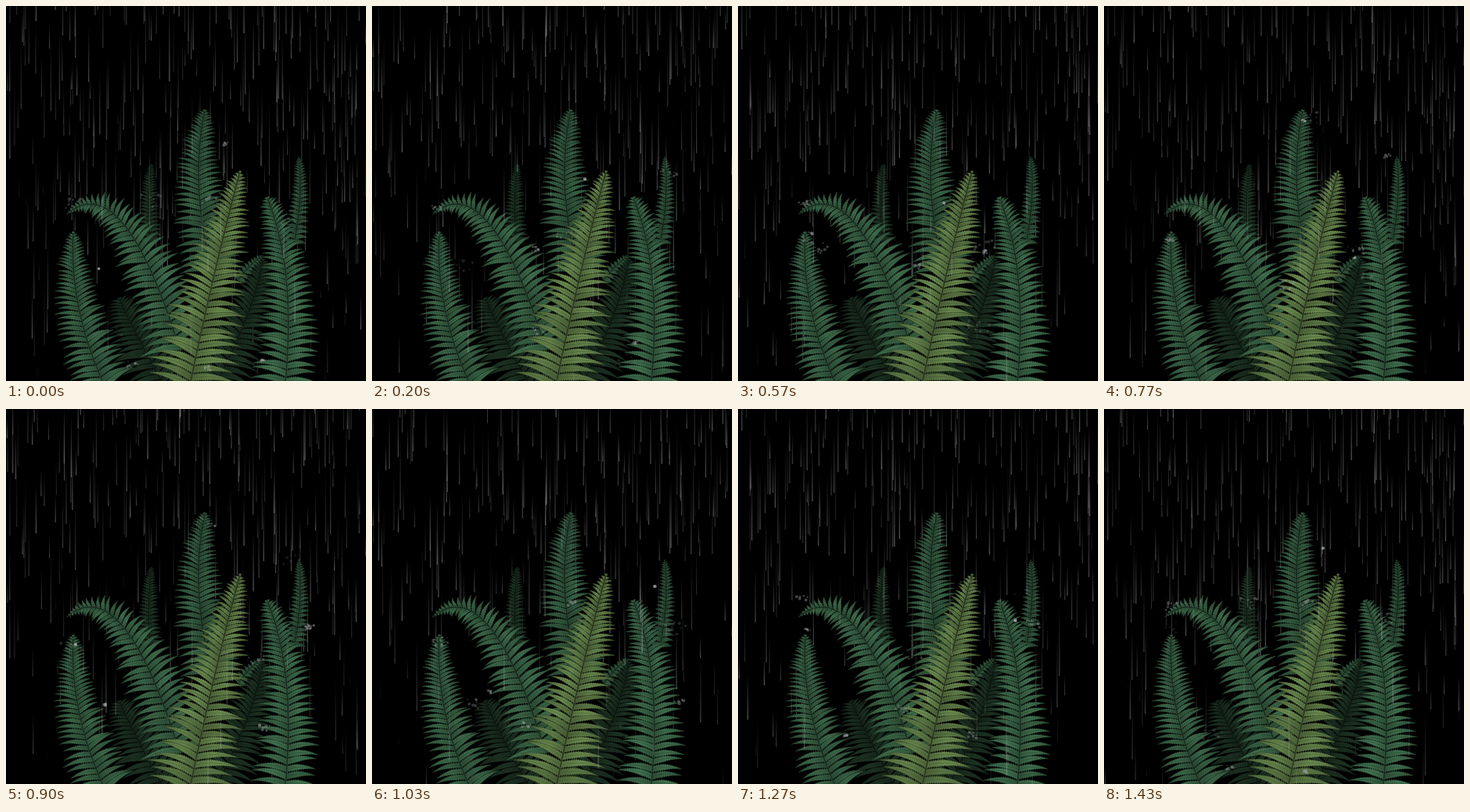
Write an HTML page with a canvas that moves like this. It is 460 px wide and 480 px high and loops after 1460 ms.

```html
<!DOCTYPE html>
<html lang="en">
<head>
<meta charset="utf-8">
<title>Ferns in the rain</title>
<style>
html, body { margin: 0; width: 100%; height: 100%; overflow: hidden; background: #000; }
canvas { display: block; width: 460px; height: 480px; }
</style>
</head>
<body>
<canvas id="stage" width="460" height="480"></canvas>
<script>
const W = 460, H = 480, LOOP = 1460, STEPS = 44;
const ctx = document.getElementById('stage').getContext('2d');

function seeded(seed) {
  return () => {
    seed = (seed + 0x6D2B79F5) | 0;
    let t = Math.imul(seed ^ (seed >>> 15), 1 | seed);
    t = (t + Math.imul(t ^ (t >>> 7), 61 | t)) ^ t;
    return ((t ^ (t >>> 14)) >>> 0) / 4294967296;
  };
}
const rand = seeded(77), vary = seeded(12);
const jitter = (r, size) => (r() - 0.5) * 2 * size;

// ---- Ferns ----

const leafLayer = document.createElement('canvas');
leafLayer.width = W;
leafLayer.height = H;
const leaf = leafLayer.getContext('2d');
const tips = [];

function trace(points) {
  leaf.beginPath();
  points.forEach(p => leaf.lineTo(p[0], p[1]));
}

// A toothed blade growing sideways from the stem, arching and then drooping.
function pinna(tone, node, side, reach, lean) {
  const { x, y, dx, dy, gap } = node;
  const n = Math.max(6, Math.round(reach / 1.4));
  const mid = [], upper = [], lower = [];
  for (let i = 0; i <= n; i++) {
    const s = i / n;
    const out = side * reach * s, rise = reach * s * (lean + 0.3 * (1 - s));
    const px = x + dy * out + dx * rise, py = y - dx * out + dy * rise;
    const half = gap * 0.49 * Math.pow(Math.min(1, (1 - s) * 1.5), 0.9) * (i % 2 ? 1 : 0.76);
    mid.push([px, py]);
    upper.push([px + dx * half, py + dy * half]);
    lower.unshift([px - dx * half, py - dy * half]);
  }
  const tip = mid[n], shade = 1 + jitter(vary, 0.1);
  const g = leaf.createLinearGradient(x, y, ...tip);
  g.addColorStop(0, tone(0.78 * shade));
  g.addColorStop(0.4, tone(shade));
  g.addColorStop(1, tone(shade));
  trace(upper.concat(lower));
  leaf.fillStyle = g;
  leaf.fill();
  leaf.lineWidth = 0.5;
  leaf.strokeStyle = tone(0.45);
  leaf.stroke();
  trace(mid);
  leaf.strokeStyle = tone(0.65);
  leaf.stroke();
  return tip;
}

// The stem is a quadratic curve from tip through bend to root.
function frond(light, tip, bend, root, reach, { taper = 0.5, gap = 9, hue = 138 } = {}) {
  const tone = k => `hsl(${hue}, 27%, ${light * k}%)`;
  const nodes = [];
  for (let u = 0.004; u < 1;) {
    const v = 1 - u;
    const at = k => v * v * tip[k] + 2 * u * v * bend[k] + u * u * root[k];
    const slope = k => 2 * (v * (tip[k] - bend[k]) + u * (bend[k] - root[k]));
    const speed = Math.hypot(slope(0), slope(1));
    const space = gap * (0.42 + 0.58 * u);
    nodes.unshift({ x: at(0), y: at(1), dx: slope(0) / speed, dy: slope(1) / speed, gap: space, u });
    u += space / speed;
  }
  for (const node of nodes) {
    for (const side of [1, -1]) {
      const size = reach * Math.pow(node.u, taper) * (1 + jitter(vary, 0.1));
      const lean = 0.5 - 0.45 * node.u + jitter(vary, 0.09);
      tips.push(pinna(tone, node, side, size, lean));
    }
  }
  trace(nodes.map(n => [n.x, n.y]));
  leaf.strokeStyle = tone(0.45);
  leaf.lineWidth = gap / 7;
  leaf.stroke();
}

frond(17, [186, 203], [180, 245], [184, 305], 16, { gap: 6 });
frond(26, [374, 194], [380, 240], [368, 305], 15, { gap: 7 });
frond(15, [328, 325], [318, 390], [265, 490], 44);
frond(15, [145, 375], [165, 420], [210, 500], 50);
frond(27, [327, 320], [312, 330], [294, 354], 10, { gap: 7 });
frond(29, [254, 134], [234, 230], [264, 340], 40);
frond(31, [78, 266], [150, 205], [222, 440], 48, { taper: 0.9, gap: 10 });
frond(31, [86, 290], [80, 390], [130, 495], 42, { taper: 0.55 });
frond(32, [334, 246], [372, 340], [356, 490], 42, { taper: 0.45, gap: 10 });
frond(39, [299, 212], [266, 335], [234, 490], 58, { taper: 0.62, gap: 11, hue: 92 });

// ---- Rain: two passes of every drop per loop ----

const CYCLE = STEPS / 2, SPEED = 28;
const drops = Array.from({ length: 560 }, (_, i) => ({
  x: rand() * W,
  len: 25 + 75 * Math.pow(rand(), 1.2),
  stop: 130 + 370 * rand(),
  phase: rand() * CYCLE,
  alpha: 0.2 + rand() * 0.24,
  wide: 0.9 + rand() * 0.6,
  front: i % 4 === 0
}));

function drawRain(step, front) {
  for (const d of drops) {
    if (d.front !== front) continue;
    const head = (step + d.phase) % CYCLE * SPEED, top = head - d.len;
    const foot = Math.min(head, d.stop);
    if (foot <= top) continue;
    const g = ctx.createLinearGradient(0, top, 0, head);
    g.addColorStop(0, 'rgba(190,190,190,0)');
    g.addColorStop(1, `rgba(190,190,190,${d.alpha})`);
    ctx.fillStyle = g;
    ctx.fillRect(d.x, top, d.wide, foot - top);
  }
}

// ---- Splashes: droplets thrown up from the leaf tips ----

const LIFE = 8;
const bursts = Array.from({ length: 56 }, (_, i) => {
  const [x, y] = tips[Math.floor(rand() * tips.length)];
  return {
    start: i * STEPS / 56,
    x: x + jitter(rand, 12),
    y: y - rand() * 8,
    dots: Array.from({ length: 6 + Math.floor(rand() * 4) }, () => ({
      vx: jitter(rand, 2.6), vy: -0.6 - rand() * 3, r: 0.8 + rand() * 1.4
    }))
  };
});

function drawSplashes(step) {
  for (const b of bursts) {
    const age = (step - b.start + STEPS) % STEPS;
    if (age >= LIFE) continue;
    ctx.fillStyle = `rgba(160,165,165,${0.4 * Math.min(1, (LIFE - age) / 4)})`;
    for (const d of b.dots) {
      ctx.beginPath();
      ctx.arc(b.x + d.vx * age, b.y + d.vy * age + 0.3 * age * age, d.r, 0, 7);
      ctx.fill();
    }
  }
}

function draw() {
  const t = performance.now() % LOOP;
  const step = Math.min(STEPS - 1, Math.floor((t + 5) * 0.03));
  ctx.fillStyle = '#000';
  ctx.fillRect(0, 0, W, H);
  drawRain(step, false);
  ctx.drawImage(leafLayer, 0, 0);
  drawRain(step, true);
  drawSplashes(step);
  requestAnimationFrame(draw);
}
draw();
</script>
</body>
</html>
```
